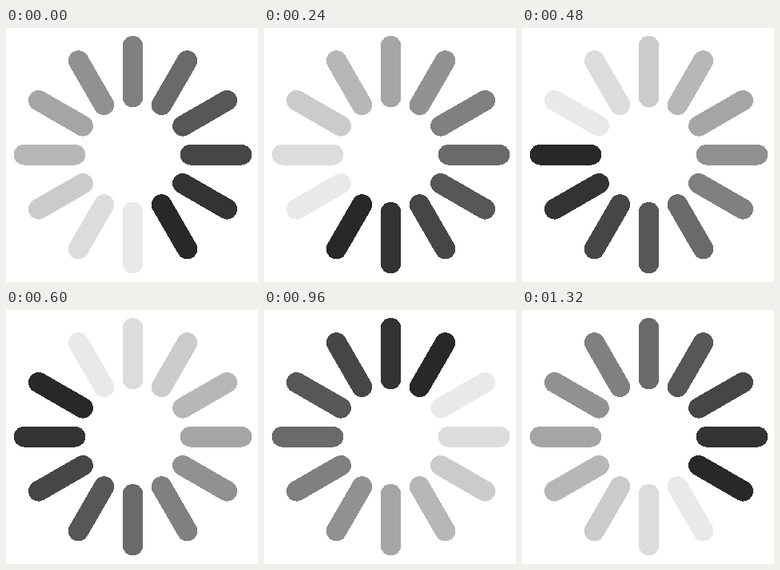
An HTML page with a canvas for the animation above (1440 ms loop, 315 by 318 pixels).

```html
<!DOCTYPE html>
<html lang="en">
<head>
<meta charset="utf-8">
<title>Spinner</title>
<style>
  html, body { margin: 0; width: 100%; height: 100%; overflow: hidden; background: #fff; }
  canvas { display: block; }
</style>
</head>
<body>
<canvas id="stage" width="315" height="318"></canvas>
<script>
const W = 315, H = 318;
const ctx = document.getElementById('stage').getContext('2d', { willReadFrequently: true });
const BARS = 12, STEP = 120;
const CX = 158.5, CY = 158.7, INNER = 72.1, OUTER = 135.9, WIDTH = 25;
const MIN_ALPHA = 38;
// Head of the trail first
const GREYS = [40, 51, 70, 87, 106, 128, 145, 165, 183, 203, 220, 233];
let shown = -1;

function drawBar(i, grey) {
  const a = i * 2 * Math.PI / BARS;
  const dx = Math.sin(a), dy = -Math.cos(a);
  ctx.strokeStyle = `rgb(${grey},${grey},${grey})`;
  ctx.beginPath();
  ctx.moveTo(CX + dx * INNER, CY + dy * INNER);
  ctx.lineTo(CX + dx * OUTER, CY + dy * OUTER);
  ctx.stroke();
}

// Make every edge pixel either solid or empty
function hardenEdges() {
  const img = ctx.getImageData(0, 0, W, H), px = img.data;
  for (let p = 3; p < px.length; p += 4) px[p] = px[p] > MIN_ALPHA ? 255 : 0;
  ctx.putImageData(img, 0, 0);
}

function draw(step) {
  ctx.clearRect(0, 0, W, H);
  ctx.lineWidth = WIDTH;
  ctx.lineCap = 'round';
  const head = 5 + step;
  for (let i = 0; i < BARS; i++) drawBar(i, GREYS[(head - i + BARS) % BARS]);
  hardenEdges();
}

const start = performance.now();
function tick() {
  const step = Math.floor((performance.now() - start) / STEP) % BARS;
  if (step !== shown) draw(shown = step);
  requestAnimationFrame(tick);
}
tick();
</script>
</body>
</html>
```
